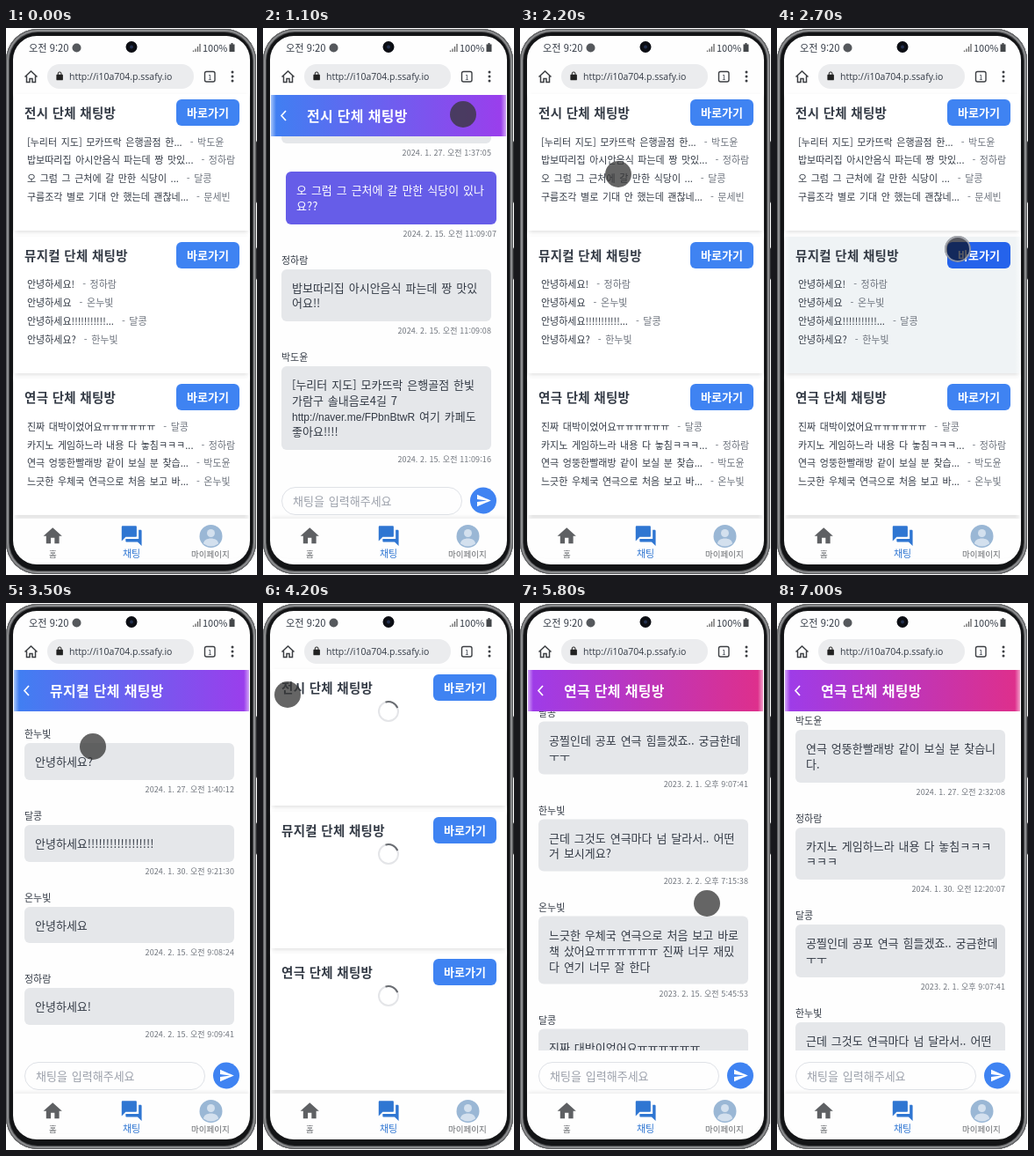
An HTML page that plays this animation: 286 px wide and 621 px high, repeating every 7600 ms.

```html
<!DOCTYPE html>
<html lang="ko">
<head>
<meta charset="utf-8">
<style>
html, body { margin: 0; width: 100%; height: 100%; overflow: hidden; background: #fff; }
body { font-family: "Noto Sans CJK KR", "Noto Sans CJK JP", "Noto Sans CJK", sans-serif; color: #333a45; }
#stage { position: relative; width: 286px; height: 621px; overflow: hidden; }
#stage div, #stage span.at, svg { position: absolute; }
.at { white-space: pre; line-height: 16px; }
.key { left: 283px; width: 3px; background: #2b2c2f; border-radius: 0 2px 2px 0; }
#phone { left: 0; top: 1px; width: 285px; height: 619px; border-radius: 36px; background: #131416;
  box-shadow: inset 0 0 0 1px #5d5e60, inset 0 0 0 3px #8a8b8d, inset 0 0 0 4px #48494b; }
#screen { left: 8px; top: 9px; width: 270px; height: 600px; border-radius: 27px; background: #fefefe; }
.card { left: 9px; width: 268px; height: 155px; background: #fff; box-shadow: 0 2px 4px #0000001c; }
.card.on { background: #eff3f5; }
.card b { position: absolute; left: 12px; top: 12px; font-size: 14.5px; line-height: 18px; letter-spacing: .3px; white-space: pre; }
.go { left: 185px; top: 6px; width: 72px; height: 30px; border-radius: 6px; background: #3f83f2; color: #fff;
  font-size: 13px; font-weight: bold; line-height: 30px; text-align: center; }
.on .go { background: #2563eb; }
.rows { left: 15px; top: 43.5px; font-size: 11px; line-height: 20.8px; word-spacing: 1.5px; white-space: pre; }
.rows i { font-style: normal; color: #6d737d; margin-left: 9px; }
.load .rows, .spin { display: none; }
.load .spin { display: block; left: 122px; top: 36px; }
#head { left: 9px; top: 76px; width: 268px; height: 47px; color: #fff; }
#clip { left: 0; top: 123px; width: 286px; height: 385px; overflow: hidden; }
.log { left: 0; bottom: 10px; width: 286px; }
.log section { margin-bottom: 13px; }
.log section:last-child { margin-bottom: 0; }
.log p { margin: 0; white-space: pre; }
.log .who { margin: 0 0 3px 21px; font-size: 11px; line-height: 16px; font-weight: 500; }
.log .say { margin: 0 26px 0 21px; padding: 12px; border-radius: 6px; background: #e5e7ea;
  font-size: 13px; line-height: 17.75px; word-spacing: 1.3px; }
.say small { font: 12px/1 "Liberation Sans", sans-serif; }
.log .when { margin: 3px 26px 0 0; text-align: right; font-size: 9px; line-height: 16px; letter-spacing: .1px; color: #70757d; }
.log .me .say { margin: 0 20px 0 26px; background: #665de8; color: #fff; }
.log .me .when { margin-right: 20px; }
#entry { left: 21px; top: 521px; width: 204px; height: 30px; border: 1px solid #dfe2e7; border-radius: 16px; }
#nav { left: 9px; top: 557px; width: 268px; height: 45px; border-radius: 0 0 20px 20px; background: #fefefe; box-shadow: 0 -2px 4px #0001; }
#fade { left: 9px; top: 72px; width: 268px; height: 485px;
  background: linear-gradient(90deg, #fff8, #fff0 6px calc(100% - 6px), #fff8); }
#dot { width: 30px; height: 30px; margin: -15px; border-radius: 50%; background: rgba(55,55,55,.77); }
#dot.down { background: rgba(12,14,24,.68); box-shadow: inset 0 0 0 2px rgba(215,218,225,.6); }
</style>
</head>
<body>
<div id="stage">
  <div class="key" style="top:128px;height:71px"></div>
  <div class="key" style="top:249px;height:37px"></div>
  <div id="phone"></div>
  <div id="screen"></div>
  <svg width="286" height="75">
    <circle cx="143" cy="21.5" r="6.5" fill="#0c0e14"/>
    <circle cx="143" cy="21.5" r="2" fill="#23304f"/>
    <circle cx="80.5" cy="22.5" r="5" fill="#55585c"/>
    <path d="M213.5 27v-1.5M216 27v-3.5M218.500 27v-6M221 27v-9" stroke="#666" stroke-width="1.3"/>
    <path d="M254.5 18.5h2v-1.5h2v1.5h2v8.5h-6z" fill="#44474a"/>
    <path d="M21.5 55.5l7-6.5 7 6.5M23.5 54.5v7h3.5v-4h3v4h3.5v-7" fill="none" stroke="#3c3f43" stroke-width="1.5"/>
    <rect x="47" y="41" width="167" height="28" rx="14" fill="#ebecee"/>
    <path transform="translate(55.5 49) scale(.47)" fill="#222" fill-rule="evenodd" d="M18 8h-1V6c0-2.760-2.240-5-5-5S7 3.240 7 6v2H6c-1.100 0-2 .9-2 2v10c0 1.100.9 2 2 2h12c1.100 0 2-.9 2-2V10c0-1.100-.9-2-2-2zM9 8V6a3 3 0 0 1 6 0v2z"/>
    <rect x="226.5" y="49.5" width="11.5" height="11.5" rx="2" fill="none" stroke="#3c3f43" stroke-width="1.4"/>
    <g fill="#3c3f43"><circle cx="258" cy="50" r="1.5"/><circle cx="258" cy="55" r="1.5"/><circle cx="258" cy="60" r="1.5"/></g>
  </svg>
  <span class="at" style="left:26px;top:14px;font-size:11.2px">오전 9:20</span>
  <span class="at" style="left:224px;top:14px;font-size:11px">100%</span>
  <span class="at" style="left:72px;top:47px;font:10.5px/16px 'Open Sans',sans-serif">http://i10a704.p.ssafy.io</span>
  <span class="at" style="left:230px;top:47.5px;font-size:8px">1</span>

  <div id="list"></div>

  <div id="chat">
    <div id="clip"></div>
    <div id="head">
      <svg width="30" height="47"><path d="M17 18l-5 5.5 5 5.5" fill="none" stroke="#fff" stroke-width="1.7"/></svg>
      <b id="name" class="at" style="position:absolute;left:41px;top:15px;font-size:16px;letter-spacing:.3px"></b>
    </div>
    <div id="entry"><span class="at" style="left:12px;top:7px;font-size:13px;word-spacing:1.3px;color:#9ca1ab">채팅을 입력해주세요</span></div>
    <svg style="left:236px;top:521px" width="31" height="31">
      <circle cx="15" cy="15.5" r="15" fill="#3f83f2"/>
      <path transform="translate(6.5 6.5) scale(.75)" fill="#fff" d="M2 21L23 12 2 3v7l15 2-15 2z"/>
    </svg>
  </div>

  <div id="fade"></div>
  <div id="nav">
    <svg width="268" height="45">
      <path transform="translate(31.5 7) scale(1.06)" fill="#5e6063" d="M10 20v-6h4v6h5v-8h3L12 3 2 12h3v8z"/>
      <path transform="translate(120.5 6) scale(1.14)" fill="#2f76d2" d="M21 6h-2v9H6v2c0 .55.45 1 1 1h11l4 4V7c0-.55-.45-1-1-1zm-4 6V3c0-.55-.45-1-1-1H3c-.55 0-1 .45-1 1v14l4-4h10c.55 0 1-.45 1-1z"/>
      <circle cx="224.5" cy="20" r="13" fill="#9ab7d5"/>
      <circle cx="224.5" cy="16.5" r="4.5" fill="#d3e0ee"/>
      <path d="M216 28.5c0-8 17-8 17 0q-8.5 6-17 0z" fill="#d3e0ee"/>
    </svg>
    <span class="at" style="left:40px;top:31.5px;font-size:9.5px;color:#66696d">홈</span>
    <span class="at" style="left:124px;top:31px;font-size:11px;color:#2f76d2">채팅</span>
    <span class="at" style="left:202px;top:31.5px;font-size:9.5px;color:#66696d">마이페이지</span>
  </div>
  <div id="dot"></div>
</div>
<script>
const $ = id => document.getElementById(id);
const A = '박도윤', B = '정하람', C = '문세빈', D = '온누빛', E = '한누빛', F = '달콩';
const hi = '안녕하세요';

// title, header colours, preview rows, messages [author, text, time]; no author = own message
const rooms = [
  ['전시 단체 채팅방', '#3f80f2, #9c3dec', [
    ['[누리터 지도] 모카뜨락 은행골점 한...', A],
    ['밥보따리집 아시안음식 파는데 짱 맛있...', B],
    ['오 그럼 그 근처에 갈 만한 식당이 ...', F],
    ['구름조각 별로 기대 안 했는데 괜찮네...', C]
  ], [
    [C, '구름조각 별로 기대 안 했는데 괜찮네요', '2024. 1. 27. 오전 1:37:05'],
    ['', '오 그럼 그 근처에 갈 만한 식당이 있나\n요??', '2024. 2. 15. 오전 11:09:07'],
    [B, '밥보따리집 아시안음식 파는데 짱 맛있\n어요!!', '2024. 2. 15. 오전 11:09:08'],
    [A, '[누리터 지도] 모카뜨락 은행골점 한빛\n가람구 솔내음로4길 7\n<small>http://naver.me/FPbnBtwR</small> 여기 카페도\n좋아요!!!!', '2024. 2. 15. 오전 11:09:16']
  ]],
  ['뮤지컬 단체 채팅방', '#3f80f2, #9c3dec', [
    [hi + '!', B], [hi, D], [hi + '!'.repeat(11) + '...', F], [hi + '?', E]
  ], [
    [E, hi + '?', '2024. 1. 27. 오전 1:40:12'],
    [F, hi + '!'.repeat(18), '2024. 1. 30. 오전 9:21:30'],
    [D, hi, '2024. 2. 15. 오전 9:08:24'],
    [B, hi + '!', '2024. 2. 15. 오전 9:09:41']
  ]],
  ['연극 단체 채팅방', '#9d3cea, #df2f8a', [
    ['진짜 대박이었어요ㅠㅠㅠㅠㅠㅠ', F],
    ['카지노 게임하느라 내용 다 놓침ㅋㅋㅋ...', B],
    ['연극 엉뚱한빨래방 같이 보실 분 찾습...', A],
    ['느긋한 우체국 연극으로 처음 보고 바...', D]
  ], [
    [A, '연극 엉뚱한빨래방 같이 보실 분 찾습니\n다.', '2024. 1. 27. 오전 2:32:08'],
    [B, '카지노 게임하느라 내용 다 놓침ㅋㅋㅋ\nㅋㅋㅋ', '2024. 1. 30. 오전 12:20:07'],
    [F, '공찔인데 공포 연극 힘들겠죠.. 궁금한데\nㅜㅜ', '2023. 2. 1. 오후 9:07:41'],
    [E, '근데 그것도 연극마다 넘 달라서.. 어떤\n거 보시게요?', '2023. 2. 2. 오후 7:15:38'],
    [D, '느긋한 우체국 연극으로 처음 보고 바로\n책 샀어요ㅠㅠㅠㅠㅠㅠ 진짜 너무 재밌\n다 연기 너무 잘 한다', '2023. 2. 15. 오전 5:45:53'],
    [F, '진짜 대박이었어요ㅠㅠㅠㅠㅠㅠ', '2024. 2. 15. 오전 9:10:15']
  ]]
];

$('list').innerHTML = rooms.map(([title, , rows], i) => `
  <div class="card" style="top:${75 + i * 161.7}px"><b>${title}</b><div class="go">바로가기</div>
  <div class="rows">${rows.map(([text, who]) => `${text}<i>- ${who}</i>`).join('\n')}</div>
  <svg class="spin" width="24" height="24" fill="none" stroke-width="2">
    <circle cx="12" cy="12" r="11" stroke="#e4e5e8"/><path d="M8.5 1.6A11 11 0 0 1 22.3 8.2" stroke="#6a6d72"/>
  </svg></div>`).join('');

$('clip').innerHTML = rooms.map(room => `<div class="log">${room[3].map(([who, text, when]) =>
  `<section class="${who ? '' : 'me'}">${who && `<p class="who">${who}</p>`}<p class="say">${text}</p><p class="when">${when}</p></section>`
).join('')}</div>`).join('');

const cards = document.querySelectorAll('.card');
const logs = document.querySelectorAll('.log');
const spins = document.querySelectorAll('.spin');

const visits = [[1100, 1800], [3200, 4000], [4800, 7600]];
const hovers = [[600, 1100], [2600, 3200], [4600, 4800]];
const presses = [[600, 800], [1600, 1800], [2700, 2800], [3800, 4000], [4600, 4800]];
const loads = [[1800, 2200], [4000, 4500]];
const path = [[200, 262, 178], [600, 228, 98], [1100, 228, 98], [1600, 41, 103], [1900, 41, 103],
  [2600, 206, 250.5], [3200, 206, 250.5], [3700, 28, 104], [4200, 28, 104], [4600, 230, 418],
  [4900, 231, 412], [5200, 231, 412], [5500, 213, 296], [5700, 213, 296], [5800, 213, 341], [6000, 206, 480]];
const scroll = [[5700, 0], [5800, 46.5], [5900, 180], [6000, 277]];

const within = (spans, t) => spans.findIndex(([a, b]) => t >= a && t < b);

function along(keys, t, k) {
  const n = keys.findIndex(p => p[0] > t);
  if (n < 0) return keys[keys.length - 1][k];
  if (!n) return keys[0][k];
  const a = keys[n - 1], b = keys[n];
  return a[k] + (b[k] - a[k]) * (t - a[0]) / (b[0] - a[0]);
}

function draw(now) {
  const t = Math.floor(now % 7600 / 100) * 100;
  const open = within(visits, t), hover = within(hovers, t), loading = within(loads, t) >= 0;

  $('list').style.display = open < 0 ? '' : 'none';
  $('chat').style.display = open < 0 ? 'none' : '';
  cards.forEach((card, i) => {
    card.classList.toggle('on', i === hover);
    card.classList.toggle('load', loading);
  });
  const turn = t < 4000 ? t - 1800 : Math.max(0, t - 4200);
  spins.forEach(s => s.style.transform = `rotate(${turn * .36}deg)`);

  if (open >= 0) {
    $('name').textContent = rooms[open][0];
    $('head').style.background = `linear-gradient(90deg, ${rooms[open][1]})`;
    logs.forEach((log, i) => log.style.display = i === open ? '' : 'none');
    logs[open].style.transform = `translateY(${along(scroll, t, 1)}px)`;
  }

  const dot = $('dot');
  dot.style.display = t >= 200 && t < 7000 && !(t >= 4900 && t < 5200) ? '' : 'none';
  dot.style.left = along(path, t, 1) + 'px';
  dot.style.top = along(path, t, 2) + 'px';
  dot.className = within(presses, t) >= 0 ? 'down' : '';
}

let start;
function tick(now) {
  start ??= now;
  draw(now - start);
  requestAnimationFrame(tick);
}
draw(0);
requestAnimationFrame(tick);
</script>
</body>
</html>
```
